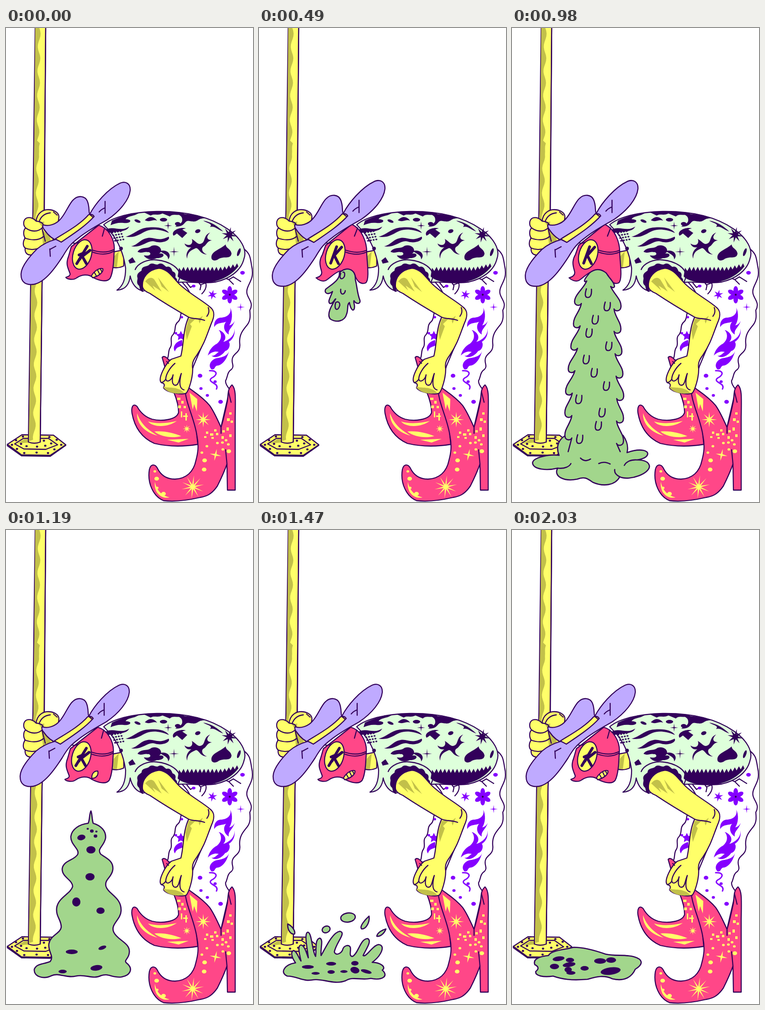
Recreate the animation shown at these times as an HTML page. Size 541 by 1036 pixels, loop 2.1 s.

```html
<!DOCTYPE html>
<html lang="en">
<head>
<meta charset="utf-8">
<title>Rough night at the pole</title>
<style>
html, body { margin: 0; width: 100%; height: 100%; overflow: hidden; background: #fff; }
svg { display: block; width: 100%; height: 100%; }
path, ellipse { stroke: #32005a; stroke-width: 2.3; stroke-linejoin: round; stroke-linecap: round; }
.y { fill: #ffff69; } .p { fill: #ff4788; } .l { fill: #bfaaff; } .m { fill: #deffdb; }
.g { fill: #a2d68c; } .w { fill: #fff; } .n { fill: none; }
#goo path, #goo ellipse { stroke-width: 2.6; }
.k { fill: #32005a; stroke: none; } .s { fill: #c2c04a; stroke: none; }
.f { fill: #ffff69; stroke: none; } .v { fill: #8500ff; stroke: none; }
.vl { fill: none; stroke: #8500ff; stroke-width: 3; }
.fat { fill: none; stroke-width: 6; }
</style>
</head>
<body>
<svg viewBox="0 0 541 1036" preserveAspectRatio="none">
  <g id="still"></g><g id="head"></g><g id="goo"></g>
</svg>
<script>
const $ = id => document.getElementById(id);
const clamp = (v, a = 0, b = 1) => Math.min(b, Math.max(a, v));
const P = (c, d) => `<path class="${c}" d="${d}"/>`;
const E = (c, x, y, rx, ry = rx, a = 0) =>
  `<ellipse class="${c}" cx="${x}" cy="${y}" rx="${rx}" ry="${ry}" transform="rotate(${a} ${x} ${y})"/>`;
const dots = (c, r, ...xy) => xy.map(([x, y]) => E(c, x, y, r, r * .85)).join('');
const boxes = (...xy) => xy.map(([x, y, w = 5, h = 5]) => P('f', `M${x} ${y}h${w}v${h}h${-w}z`)).join('');

function star(c, x, y, r, n, inner = .25, turn = 0) {
  let d = '';
  for (let i = 0; i < n * 2; i++) {
    const a = turn + i * Math.PI / n, q = i % 2 ? r * inner : r;
    d += `${i ? 'L' : 'M'}${(x + q * Math.sin(a)).toFixed(1)} ${(y - q * Math.cos(a)).toFixed(1)}`;
  }
  return P(c, d + 'z');
}

function pole() {
  let shade = 'M64 0';
  for (let y = 0; y <= 900; y += 6) {
    const notch = y > 246 && y < 276 ? 9 * (1 - (y - 246) / 30) : 0;
    shade += `L${(73 - y * .0125 + 3 * Math.sin(y / 8.5) + notch).toFixed(1)} ${y}`;
  }
  return P('y', 'M3 910L35 889L104 890L131 911L97 934L34 933Z') +
    P('n', 'M3 910V913L34 935L97 936L131 912') +
    P('y', 'M19 909L38 897H93L113 911L87 921L39 920Z') +
    P('s', 'M24 908L40 899H50V906Z') +
    dots('k', 2.6, [22, 901], [37, 893], [95, 894], [111, 900], [121, 911], [106, 921], [92, 929],
      [67, 928], [40, 929], [24, 920], [13, 911], [33, 909], [45, 914], [68, 915], [86, 913], [99, 908], [83, 902]) +
    P('y', 'M64 -3L61 230L59 400L54 560L49 905Q62 910 75 905L79 560L84 400L87 -3Z') +
    P('s', shade + 'L50 903L55 560L60 400L62 230Z') +
    P('n', 'M87 0L83.5 400L79 560L75 905');
}

const fist = () =>
  P('y', 'M66 422C68 405 80 397 92 397C104 397 116 403 116 413L112 440L90 496H55C44 497 41 488 42 481C36 476 37 466 42 459C37 452 38 441 43 437C36 430 38 418 46 415C54 413 62 417 66 422Z') +
  P('s', 'M78 440L96 456L100 470L82 485L80 462ZM72 425L84 423L80 436Z') +
  P('n', 'M43 437C54 445 69 447 79 437C84 430 82 424 66 422M41 459C55 464 71 465 82 456M42 481C54 486 66 485 79 478M73 422C78 409 87 405 97 404M104 402L112 409M79 438L86 466');

const backLeg = () =>
  P('w', 'M388 615C380 622 385 633 378 641C366 650 374 660 366 670C357 678 366 690 360 698C354 706 358 715 353 724L390 735L410 640Z') +
  dots('v', 3, [385, 632], [372, 667]) +
  star('v', 383, 673, 11, 5, .5) +
  P('v', 'M386 682C370 686 364 698 370 707C374 696 379 698 386 694Z') +
  P('p', 'M342 720Q347 714 357 726L360 748H350Z') +
  P('p', 'M368 797C374 812 378 826 378 840C374 857 340 860 320 855C304 850 293 838 287 827C278 819 274 829 276 842C282 875 300 897 325 908C355 915 390 915 420 910L415 860L396 797Z') +
  P('f', 'M287 842C286 868 308 885 332 891C314 880 296 868 287 842ZM311 860C330 866 352 864 374 859C354 873 324 874 311 860ZM325 882C346 880 366 885 384 892C364 897 340 894 325 882ZM353 900L400 898L378 906Z') +
  boxes([375, 808, 7, 5], [384, 815, 5, 6], [377, 825, 6, 6], [389, 826], [383, 838, 3, 13], [393, 842, 3, 16], [388, 847, 10, 3]) +
  star('f', 396, 876, 9, 8, .3);

const trousers = () =>
  P('w', 'M380 548C388 560 398 566 403 580L425 610L448 650L411 738L396 785L471 872L490 790Q480 778 481 771C486 762 484 752 494 746C502 738 491 730 497 719C502 709 514 708 512 690C510 670 519 660 529 648C536 638 535 628 534 617C546 596 521 589 529 568C534 554 544 545 538 520C535 500 534 492 520 482L490 530Z') +
  P('n', 'M419 552L427 563L425 572M427 561L440 556M437 556C441 566 435 575 429 581M476 545L488 550L498 560M488 550L498 544L514 554M396 557L404 567L411 563') +
  E('v', 518, 535, 5, 4) + E('v', 411, 564, 4, 3) +
  star('v', 452, 583, 11, 6, .35, .2) + star('v', 514, 610, 9, 4, .15) +
  [0, 60, 120, 180, 240, 300].map(a => `<g transform="rotate(${a} 490 583)">${E('v', 490, 573, 5, 9)}</g>`).join('') +
  E('w', 490, 583, 1) +
  P('v', 'M491 611C495 624 484 633 470 633C459 634 455 644 456 654C462 643 472 646 482 642C474 652 478 664 488 670C486 658 496 656 501 640C498 646 494 649 489 650C496 640 497 622 491 611ZM500 655C503 670 490 682 476 686C486 676 478 664 466 660C474 670 472 682 462 690C452 695 445 704 442 716C450 708 458 706 466 708C460 712 456 718 450 716C458 724 474 716 480 706C490 704 492 690 488 686C498 680 503 668 500 655ZM489 704C486 718 472 720 460 722C448 726 442 738 450 746C458 748 456 740 462 738C472 738 484 726 489 704Z') +
  P('vl', 'M446 749C460 748 465 755 454 763C440 770 452 774 459 779C464 783 462 787 461 789') +
  dots('v', 5, [425, 760], [470, 817]) + dots('v', 3.5, [427, 788], [441, 803], [458, 773]);

const frontBoot = () =>
  P('p', 'M392 779C404 792 426 801 446 825C456 839 463 855 471 873C478 850 481 835 485 815C487 800 485 789 495 780C503 788 503 800 502 850V1010H485L484 953C478 970 470 987 463 1001C450 1020 438 1024 425 1026C395 1033 370 1036 345 1033C323 1024 309 995 314 965C317 952 326 953 331 961C338 976 350 986 370 986C395 985 411 970 416 945C420 930 423 915 418 890C412 850 390 815 392 779Z') +
  P('n', 'M484 953L481 922M487 794L493 818M471 873L471 886') +
  P('f', 'M402 797L419 811L418 838L412 822L409 834ZM326 992C330 1012 342 1022 358 1026C338 1030 324 1014 326 992Z') +
  star('f', 432, 856, 17, 8, .25) + star('f', 459, 933, 13, 4, .2, .2) + star('f', 409, 1003, 25, 10, .2, .1) +
  boxes([489, 840], [484, 853, 6, 6], [492, 858], [438, 882], [447, 886, 7, 5], [456, 877], [460, 885], [434, 892, 5, 4],
    [450, 894, 5, 4], [472, 892, 5, 6], [489, 888, 5, 6], [474, 879], [483, 873, 5, 7]) +
  dots('f', 5, [435, 945], [488, 925], [434, 965], [330, 985], [345, 1018]) +
  dots('f', 3, [440, 914], [463, 907], [474, 906], [482, 901], [429, 928], [487, 910], [475, 921], [326, 969], [331, 1005]);

function shirt() {
  let hem = 'M376 543L379 524';
  for (let x = 384; x < 506; x += 9) hem += `L${x} ${531 - (x > 470 ? (x - 470) / 4 : 0)}l5 -9`;
  const grid = [];
  for (let i = 0; i < 4; i++) for (let j = 0; j < 4; j++) grid.push([233 + i * 6 + j * 2, 447 + j * 6 - i]);
  return P('y', 'M232 490L258 485V520Q247 526 232 523Z') + P('s', 'M236 500L247 488L243 522H233Z') +
    P('m', 'M214 430C235 412 280 402 330 401C400 400 450 415 485 439C515 459 529 485 521 505C515 530 490 548 460 555C430 560 402 553 376 556L300 575C285 571 276 560 272 542C270 562 260 572 243 573C257 563 262 548 262 525C258 497 248 468 229 446Z') +
    P('k', hem + 'L509 521C490 546 460 556 435 557C410 558 385 553 376 543Z') +
    P('k', 'M232 421C250 412 270 407 291 404C282 412 266 410 262 418C279 418 273 428 257 426C246 425 239 427 229 431ZM300 402H347C336 413 324 404 317 410ZM337 403C350 400 380 402 391 406C380 412 365 404 359 412ZM372 405C401 406 424 411 438 416C416 415 424 426 403 422C389 418 395 435 371 434C378 427 386 429 386 419C386 411 380 409 372 405ZM304 420C316 408 326 414 331 421C321 417 316 426 304 420ZM218 441C236 431 250 447 270 434C262 449 238 442 222 449Z') +
    P('k', 'M262 456C280 452 290 437 312 436C334 434 350 438 357 448C336 439 320 439 309 443C294 449 284 460 262 456ZM274 477C288 475 293 462 310 459C324 456 334 468 356 456C362 463 343 472 327 467C311 461 298 482 274 477ZM288 489C297 477 310 484 319 476C337 471 346 488 335 493C350 491 348 503 330 503C316 510 304 502 302 497C322 500 317 488 310 490C302 488 298 494 288 489ZM268 508L277 501L284 512L271 515ZM337 488C352 482 365 495 355 506C356 497 347 494 337 488Z') +
    P('k', 'M373 448L384 439L397 448L386 459ZM367 454C360 444 380 434 394 438C382 440 378 448 367 454ZM391 471C403 479 411 471 407 461C416 466 420 475 428 471C437 468 432 453 447 447C438 456 439 463 451 464C440 466 440 473 434 477C427 480 428 490 440 495C424 494 424 482 416 481C408 485 397 488 397 504C392 492 400 484 406 479C398 481 393 477 391 471Z') +
    P('k', 'M450 503C448 488 470 484 481 473C482 482 492 482 494 493C492 507 475 497 464 506C457 510 451 508 450 503ZM432 421C450 424 462 432 476 445C462 440 457 432 447 435C454 427 440 427 432 421Z') +
    star('k', 489, 452, 17, 8, .35, .2) + star('k', 355, 432, 9, 4, .15) + star('k', 368, 489, 11, 4, .12) +
    dots('k', 2.2, ...grid) + E('k', 345, 419, 8, 4) + E('k', 376, 428, 6, 4) + E('k', 420, 444, 6, 4, -20) +
    E('k', 288, 422, 7, 3, 20) + E('k', 252, 482, 4) + E('k', 510, 490, 3, 9, 20) +
    P('n', 'M283 528C288 515 308 505 330 507C360 510 381 525 381 542C380 549 378 553 376 556') +
    P('k', 'M300 577C291 574 294 566 291 563C284 557 289 550 288 546C285 536 294 533 297 530C297 520 308 522 313 518C319 511 327 518 332 517C342 511 346 519 351 522C361 519 363 528 365 532C374 535 371 541 371 545C378 551 374 555 369 553L342 527C320 527 303 540 300 577Z');
}

const arm = () =>
  P('y', 'M299 566C297 545 312 528 335 525C355 527 365 545 378 558C400 580 430 595 447 610C458 618 457 630 450 645C440 670 435 690 418 715C409 727 407 735 409 745C409 765 401 790 395 798C385 803 350 796 345 786Q350 777 340 775C332 767 348 735 362 724L383 717C390 690 387 660 400 632C370 615 345 600 315 580C305 576 300 572 299 566Z') +
  P('s', 'M305 554C311 546 319 543 325 550L341 576L321 563L327 574ZM333 545L357 577L341 565ZM393 661L400 636L418 633L403 647L407 652L396 682ZM421 636L431 629L424 646ZM344 784C357 788 374 782 390 797C375 803 350 796 344 784Z') +
  P('n', 'M400 632C412 637 422 634 435 639M443 611C446 619 444 625 440 630M370 733C357 744 350 759 350 767C351 776 363 771 366 758C364 768 363 776 368 780C379 785 379 765 384 755C378 778 381 789 390 791M340 775C345 774 348 771 350 767M356 733L352 729');

const hat = () =>
  P('l', 'M81 430C92 434 109 430 119 418C130 407 139 382 148 375C158 365 173 367 178 378C184 392 180 402 184 409L115 466C106 463 94 456 84 441Q79 435 81 430Z') +
  P('l', 'M33 537C34 522 48 503 68 483C83 470 98 465 109 462L121 467C145 450 172 433 184 406C195 385 222 352 250 339C262 334 273 340 272 355C270 375 250 400 222 419C200 432 180 442 160 458C141 472 135 481 125 498C110 521 87 555 62 560C44 563 32 556 33 537Z') +
  P('y', 'M108 461C130 447 162 430 181 408Q190 406 193 412C173 434 146 451 121 468Z') +
  P('n', 'M217 379V405M217 393Q209 396 204 402M96 483L97 499M96 484L109 477M184 408L190 413');

const eye = scrawl => E('y', 167, 495, 20, 33, 17) + P('fat', scrawl);
const restFace = mouth =>
  P('p', 'M203 431C224 437 239 462 237 486C236 508 235 534 228 547C222 556 205 553 190 545C180 537 165 539 155 546C148 552 133 549 131 545C137 543 142 541 140 536C136 525 130 516 137 499L143 478Z') +
  P('n', 'M188 485C205 491 221 492 237 484M190 490C207 496 221 496 236 488M144 469C156 475 165 462 177 465M216 437L211 455') +
  eye('M178 477L155 515M160 496L167 493L162 505M184 486L167 499L176 515') + mouth;
const teeth = P('y', 'M187 542C193 531 204 524 212 526C214 534 203 542 190 546Z') + P('n', 'M194 535L198 542M201 530L205 538M207 527L210 533');
const pout = P('y', 'M190 543C189 533 195 526 203 527C205 535 200 543 190 543Z');
const sickFace =
  P('p', 'M203 429C227 440 236 470 236 490C236 510 243 548 234 557C222 562 214 552 210 540L178 531C166 534 155 547 146 552C139 555 130 551 125 546C133 544 139 540 137 532C134 521 130 510 139 495L146 475Z') +
  P('n', 'M188 485C205 491 221 492 235 486M190 490C207 496 221 496 235 490M145 469C156 475 165 462 177 465M216 437L209 455') +
  eye('M170 478L157 514M181 479L165 497L174 515');

const widen = 'translate(152 450) scale(1.032 1.035) translate(-152 -450)';
const faces = {
  rest: restFace(teeth) + hat(),
  pout: restFace(pout) + hat(),
  sick: sickFace + `<g transform="${widen}">${hat()}</g>`
};

const blob =
  P('g', 'M176 535C178 550 160 560 146 571C142 580 151 584 161 576C156 590 150 598 155 602C163 604 165 592 168 592C160 605 147 625 156 636C170 645 188 641 192 625C196 615 192 605 198 600C200 612 205 620 208 615C212 608 206 600 208 596C214 605 223 603 221 595C215 580 215 565 211 550C213 526 190 520 176 535Z') +
  P('n', 'M179 536C174 550 183 551 187 543C189 535 186 532 184 534M179 571C177 585 188 584 189 574M168 600C163 616 173 621 177 606C177 599 173 597 168 600');

// Dripping column: overhanging lumps travel down with the shift.
function column(top, bottom, shift, { floor = false, loose = false } = {}) {
  const step = 49;
  const mid = y => 188 - 8 * clamp((y - 600) / 220);
  const half = y => (17 + 19 * clamp((y - 530) / 60) + 13 * clamp((y - 640) / 160)) *
    (loose ? clamp((y - top) / 110 + .04) : 1);
  const at = (y, side, out = 0) => `${(mid(y) + side * (half(y) + out)).toFixed(1)} ${y.toFixed(1)}`;

  function flank(side) {
    const pts = [at(top, side)];
    const first = 600 + shift + (side > 0 ? 12 : 0);
    let y = top, next = first + Math.ceil((top + 14 - first) / step) * step;
    for (; next <= bottom; y = next, next += step) {
      const h = next - y, o = h / step;
      pts.push(at(y + h * .35, side, 2), at(y + h * .6, side, 17 * o), at(y + h * .92, side, 15 * o),
        at(y + h * 1.12, side, 14 * o), at(y + h * 1.12, side, 3), at(next, side));
    }
    if (floor) pts.push(at(y, side), at(bottom, side, 8), at(bottom, side, 8));
    return pts;
  }
  const left = flank(-1).reverse(), right = flank(1);
  const cap = `Q${mid(top)} ${top - (loose ? 2 : 16)} ${right[0]}`;
  const tail = floor ? '' : `C${at(bottom, 1)} ${at(bottom, -1)} ${left[0]}Z`;
  const d = `M${left[0]}C${left.slice(1).join(' ')}${cap}C${right.slice(1).join(' ')}${tail}`;

  let drips = '';
  for (let k = -6; k < 14; k++) {
    const y = 548 + k * 29 + shift;
    if (y < top + 8 || y > bottom - 26) continue;
    const x = mid(y) - 5 + half(y) * .7 * Math.sin(k * 2.3 + 1);
    drips += `M${x.toFixed(1)} ${y}q-6 19 3 19q9 0 8 -18`;
  }
  return P('g', d) + P('n', drips);
}

const heap =
  P('g', 'M118 890C98 902 97 918 103 934C85 931 45 938 45 951C47 965 76 968 100 962C90 980 114 992 143 986C158 980 165 984 177 993C200 1003 226 1000 236 981C258 991 303 973 301 957C299 947 286 944 274 944C300 940 304 926 287 923C275 921 263 924 252 928C256 912 250 900 243 890Z') +
  P('n', 'M100 962C116 964 126 958 129 952M236 981C228 977 224 971 225 965M274 944C260 943 250 948 246 956M190 952Q202 946 215 953M150 940Q160 950 172 942');

const pile =
  P('g', 'M186 614C189 621 188 632 191 641C208 646 220 658 218 674C214 692 199 696 207 708C218 717 236 722 234 742C232 760 215 763 219 779C224 796 254 803 252 833C251 852 228 862 236 879C244 897 273 902 270 924C269 939 255 940 266 948C279 960 272 974 252 977C232 979 224 968 208 974C190 983 174 970 153 975C131 980 116 967 100 974C82 983 60 976 62 960C67 947 84 949 97 943C106 931 91 921 94 904C98 885 119 882 121 868C121 851 109 846 111 826C114 803 142 795 146 779C145 764 123 759 123 741C125 722 150 722 157 709C162 697 141 688 142 670C144 654 161 643 180 641C184 632 182 622 186 614Z') +
  E('k', 165, 672, 9, 6, -10) + E('k', 186, 699, 10, 8) + E('k', 184, 758, 10, 8) + E('k', 154, 813, 9, 10) + E('k', 207, 832, 9, 7) +
  E('k', 144, 922, 13, 5) + E('k', 211, 913, 9, 4, -20) + E('k', 198, 957, 13, 6, -8) + E('k', 124, 965, 9, 4) +
  dots('k', 4, [188, 658], [196, 669]) + dots('k', 2.5, [179, 653], [198, 659]);

const splash =
  P('g', 'M62 975C45 968 55 950 80 946C72 935 68 922 76 919C84 922 86 935 92 942C88 925 84 908 92 907C100 908 104 925 108 935C106 915 98 880 107 879C116 880 116 920 124 932C126 915 122 895 133 892C142 895 134 915 136 930C145 915 160 880 177 877C192 880 170 900 165 922C168 932 180 925 183 918C185 908 197 905 200 912C202 920 196 932 205 932C218 925 222 893 238 893C248 898 235 915 228 930C235 935 248 908 262 906C278 908 268 930 248 945C265 945 280 955 270 962C285 975 270 985 245 980C225 985 205 975 190 985C165 995 140 980 120 983C95 988 85 975 62 975Z') +
  E('k', 107, 955, 13, 4) + E('k', 158, 948, 11, 4) + E('k', 210, 947, 8, 5) + E('k', 210, 962, 10, 7, 15) + E('k', 235, 965, 12, 4, 15) +
  E('k', 158, 966, 8, 4) + E('k', 124, 969, 9, 3) + E('k', 186, 965, 8, 3);
const drops =
  E('g', 195, 847, 16, 10, -8) + E('g', 147, 873, 9, 7, -25) +
  P('g', 'M241 844C243 857 235 872 225 872C219 867 232 852 241 844ZM278 872C274 883 265 889 258 888C259 880 270 874 278 872ZM63 861C73 866 80 876 78 883C69 885 62 873 63 861Z');

const puddle =
  P('g', 'M50 950C45 938 60 932 80 930C85 918 120 917 135 912C160 912 185 920 205 927C225 932 250 927 268 933C285 938 290 948 270 960C262 978 245 987 220 981C200 971 180 978 165 982C130 985 110 982 90 975C70 978 50 975 52 965C58 960 60 955 50 950Z') +
  E('k', 102, 937, 13, 5, -8) + E('k', 127, 940, 9, 5) + E('k', 125, 950, 14, 5, -8) + E('k', 93, 954, 10, 6) + E('k', 123, 961, 8, 6) +
  E('k', 159, 958, 9, 5) + E('k', 129, 968, 10, 4) + E('k', 193, 942, 13, 6) + E('k', 217, 940, 11, 6) + E('k', 216, 964, 22, 8, -8);

const grow = (art, sx, sy, x, y) => `<g transform="translate(${x} ${y}) scale(${sx} ${sy}) translate(${-x} ${-y})">${art}</g>`;
const lift = (art, y) => `<g transform="translate(0 ${y})">${art}</g>`;

function goo(n) {
  const shift = (n - 11) * 17;
  if (n < 6) return '';
  if (n < 7) return grow(blob, .7, .5, 194, 530);
  if (n < 8) return blob;
  if (n < 10) return column(536, n < 9 ? 700 : 860, shift);
  if (n < 15) return grow(heap, n < 11 ? .75 : 1, n < 11 ? .8 : 1, 180, 950) + column(536, 926, shift, { floor: true });
  if (n < 16) return heap + column(563, 926, shift, { floor: true, loose: true });
  if (n < 20) return grow(pile, [1.03, 1, 1.03, 1.06][n - 16], [1.13, 1, .78, .48][n - 16], 168, 978);
  if (n < 25) return grow(splash, 1, [.7, 1, .8, .55, .35][n - 20], 168, 985) + (n < 24 ? lift(drops, [35, 0, 8, 45][n - 20]) : '');
  return puddle;
}

const sway = [[0, 0], [-1, 0], [-2, 0], [-1, -1], [1, -1], [3, -1], [2, 0]];
function pose(n) {
  const face = n < 5 ? 'rest' : n < 17 ? 'sick' : n < 20 ? 'pout' : 'rest';
  return [face, sway[n] || (n < 17 ? [0, 0] : [-2, 0])];
}

$('still').innerHTML = pole() + fist() + backLeg() + trousers() + frontBoot() + shirt() + arm();

let shown = -1;
function draw(now) {
  const n = Math.floor(now % 2100 / 70);
  if (n !== shown) {
    const [face, [x, y]] = pose(n);
    $('head').innerHTML = faces[face];
    $('head').setAttribute('transform', `translate(${x} ${y})`);
    $('goo').innerHTML = goo(n);
    shown = n;
  }
  requestAnimationFrame(draw);
}
draw(performance.now());
</script>
</body>
</html>
```
